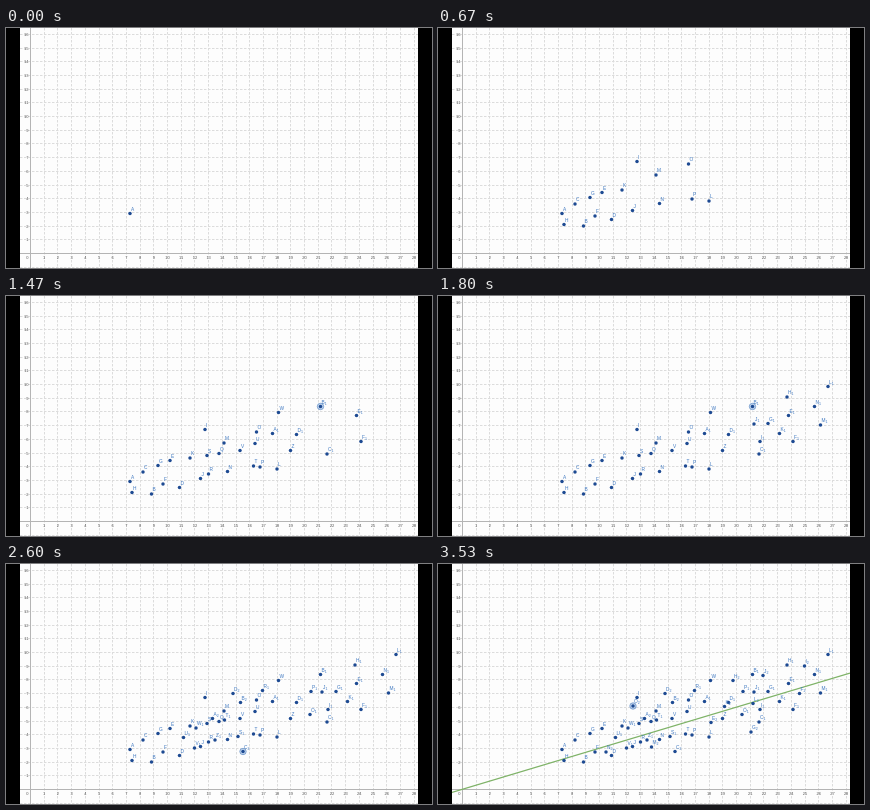
An HTML page with a canvas that plays this animation: 426 px wide and 240 px high, repeating every 3590 ms.

```html
<!DOCTYPE html>
<html lang="en">
<head>
<meta charset="utf-8">
<title>Scatter plot with line of best fit</title>
<style>
  html, body { margin: 0; width: 100%; height: 100%; overflow: hidden; background: #000; }
  canvas { display: block; width: 426px; height: 240px; }
</style>
</head>
<body>
<canvas id="stage" width="426" height="240"></canvas>
<script>
const ctx = document.getElementById("stage").getContext("2d");
const LOOP = 3590, STEP = 200 / 3;
const LEFT = 14, RIGHT = 412, BOTTOM = 240;
const ORIGIN = { x: 24.5, y: 225.5 }, UNIT = 13.7;
const LINE_STEP = 50;
const FONT = "'Liberation Sans', Arial, sans-serif";

// Each batch: letters, subscript, first and last step, point positions.
const batches = [
  ["ABCDEFGH", "", 0, 4.67, "124,185.5 145.5,198 137,176 173.5,191.5 164,164.5 157,188 152,169.5 126,196.5"],
  ["IJKLMNOP", "", 5.33, 10, "199,133.5 194.5,182.5 184,162 271,173 218,147 221.5,175.5 250.5,136 254,171"],
  ["QRSTUVW", "", 11, 16, "213,157.5 202.5,178 201,159.5 247.5,170 249,147.5 234,154.5 272.5,116.5"],
  ["A", "1", 17, 17, "266.5,137.5"],
  ["Z", "", 18, 18, "284.5,154.5"],
  ["BCDEFGH", "1", 19, 23, "314.5,110.5 321,158 290.5,138.5 350.5,119.5 355,145.5 330,127.5 349,101"],
  ["IJKLMN", "1", 24, 27, "322,145.5 316,128 341.5,137.5 390,90.5 382.5,129 376.5,110.5"],
  ["OPRSTUV", "1", 28, 33, "304,150.5 305,127.5 256.5,126.5 232,172.5 218.5,156 177.5,173.5 188.5,184"],
  ["WZ", "1", 34, 35, "190,164 209,176"],
  ["ABCDEF", "2", 36, 40, "206.5,154.5 234.5,138.5 237,187.5 227,129.5 273,158.5 361.5,129.5"],
  ["GHIJKL", "2", 41, 45, "313,168 295,116.5 366.5,102 325,111.5 286.5,142.5 315,139.5"],
  ["MNO", "2", 46, 48, "213.5,183 168,188 195,142"]
];

const points = batches.flatMap(([letters, sub, first, last, places]) =>
  places.split(" ").map((place, i, all) => {
    const [x, y] = place.split(",").map(Number);
    const share = all.length > 1 ? i / (all.length - 1) : 0;
    return { x, y, letter: letters[i], sub, step: Math.ceil(first + (last - first) * share) };
  }));

const sticky = points.filter(p => ["B1", "C2", "O2"].includes(p.letter + p.sub));

function stroke(x1, y1, x2, y2, color, width = 1) {
  ctx.strokeStyle = color;
  ctx.lineWidth = width;
  ctx.beginPath();
  ctx.moveTo(x1, y1);
  ctx.lineTo(x2, y2);
  ctx.stroke();
}

function text(value, x, y, size, color, align = "left") {
  ctx.font = `${size}px ${FONT}`;
  ctx.fillStyle = color;
  ctx.textAlign = align;
  ctx.fillText(value, x, y);
}

function circle(x, y, r) {
  ctx.beginPath();
  ctx.arc(x, y, r, 0, Math.PI * 2);
}

function drawGrid() {
  ctx.setLineDash([2.5, 1.5]);
  for (let i = 1; i <= 28; i++) {
    const x = Math.floor(ORIGIN.x + i * UNIT) + 0.5;
    stroke(x, 0, x, BOTTOM, "#dcdcdc");
  }
  for (let i = -1; i <= 16; i++) {
    const y = Math.floor(ORIGIN.y - i * UNIT) + 0.5;
    stroke(LEFT, y, RIGHT, y, "#dcdcdc");
  }
  ctx.setLineDash([]);
  stroke(LEFT, ORIGIN.y, RIGHT, ORIGIN.y, "#b4b4b4");
  stroke(ORIGIN.x, 0, ORIGIN.x, BOTTOM, "#b4b4b4");

  const gray = "#555";
  text("0", 22.5, 230.5, 4, gray, "right");
  for (let i = 1; i <= 28; i++) text(i, ORIGIN.x + i * UNIT, 230.5, 4, gray, "center");
  for (let i = 1; i <= 16; i++) text(i, 22.5, ORIGIN.y - i * UNIT + 1.5, 4, gray, "right");
}

function drawPoint(p, highlighted) {
  if (highlighted) {
    circle(p.x, p.y, 3.2);
    ctx.fillStyle = "#c3d6ee";
    ctx.fill();
    ctx.strokeStyle = "#5f8cc4";
    ctx.lineWidth = 0.7;
    ctx.stroke();
  }
  circle(p.x, p.y, 1.75);
  ctx.fillStyle = "#1d4a92";
  ctx.fill();
  text(p.letter, p.x + 1, p.y - 2.6, 4.8, "#3f78c0");
  if (p.sub) {
    const width = ctx.measureText(p.letter).width;
    text(p.sub, p.x + 1 + width, p.y - 1.6, 3.6, "#3f78c0");
  }
}

function draw(step) {
  ctx.fillStyle = "#000";
  ctx.fillRect(0, 0, 426, 240);
  ctx.save();
  ctx.beginPath();
  ctx.rect(LEFT, 0, RIGHT - LEFT, BOTTOM);
  ctx.clip();
  ctx.fillStyle = "#fdfdfd";
  ctx.fillRect(LEFT, 0, RIGHT - LEFT, BOTTOM);
  drawGrid();
  if (step >= LINE_STEP) stroke(LEFT, 228.5, RIGHT, 109, "#7fb368", 1.2);
  const active = sticky.filter(p => p.step <= step).pop();
  for (const p of points) if (p.step <= step) drawPoint(p, p === active);
  ctx.restore();
}

const start = performance.now();
function tick() {
  const time = (performance.now() - start) % LOOP;
  draw(Math.floor((time + 4) / STEP));
  requestAnimationFrame(tick);
}
tick();
</script>
</body>
</html>
```
